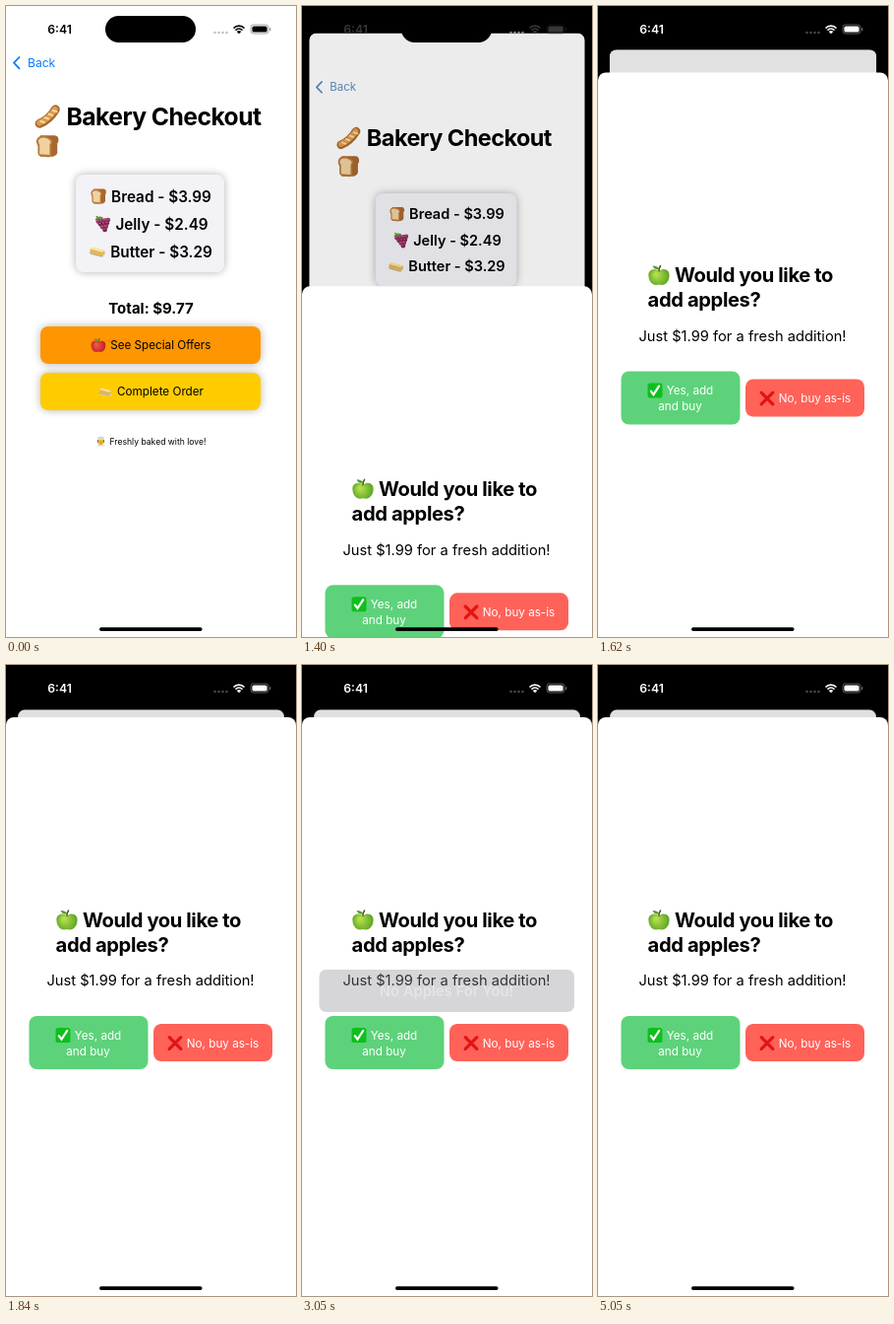
Recreate the animation shown at these times as an HTML page with a canvas. Size 295x640 px, loop 5.59 s.

```html
<!DOCTYPE html>
<html lang="en">
<head>
<meta charset="utf-8">
<title>Bakery Checkout</title>
<style>
  html, body { margin: 0; width: 100%; height: 100%; overflow: hidden; background: #fff; }
  canvas { display: block; width: 295px; height: 640px; }
</style>
</head>
<body>
<canvas id="stage"></canvas>
<script>
const W = 295, H = 640, LOOP = 5590;
const STEPS = [0, 1180, 1290, 1400, 1510, 1620, 1730, 1840, 2810, 2930, 3050, 3160, 3280, 3400, 5050];
const SHEET_TOP = 53, CORNER = 8;

const canvas = document.getElementById('stage');
const ctx = canvas.getContext('2d');
const ratio = window.devicePixelRatio || 1;
canvas.width = W * ratio;
canvas.height = H * ratio;

const clamp = v => Math.max(0, Math.min(1, v));
const ramp = (t, from, to) => clamp((t - from) / (to - from));
const smooth = v => v * v * (3 - 2 * v);
const mix = (from, to, amount) => from.map((v, i) => Math.round(v + (to[i] - v) * amount));

// Critically damped spring, 0 at rest and 1 when settled.
function spring(seconds, speed) {
  const x = Math.max(0, seconds) * speed;
  return 1 - (1 + x) * Math.exp(-x);
}

function group(alpha, draw) {
  ctx.save();
  ctx.globalAlpha *= alpha;
  draw();
  ctx.restore();
}

function box(x, y, w, h, r, fill) {
  ctx.beginPath();
  ctx.roundRect(x, y, w, h, r);
  ctx.fillStyle = fill;
  ctx.fill();
}

function shadowBox(x, y, w, h, r, fill) {
  ctx.save();
  ctx.shadowColor = 'rgba(0,0,0,0.3)';
  ctx.shadowBlur = 9 * ratio;
  box(x, y, w, h, r, fill);
  ctx.restore();
}

function text(str, x, y, size, weight = 400, color = '#000', spacing = 0, align = 'center') {
  ctx.font = `${weight} ${size}px Inter, "Liberation Sans", sans-serif`;
  ctx.letterSpacing = spacing + 'px';
  ctx.textAlign = align;
  ctx.textBaseline = 'alphabetic';
  ctx.fillStyle = color;
  ctx.fillText(str, x, y + size * 0.36);
}

function blob(path, fill) {
  ctx.fillStyle = fill;
  ctx.fill(new Path2D(path));
}

function line(path, color, width) {
  ctx.strokeStyle = color;
  ctx.lineWidth = width;
  ctx.stroke(new Path2D(path));
}

function dot(x, y, r, fill) {
  ctx.beginPath();
  ctx.arc(x, y, r, 0, Math.PI * 2);
  ctx.fillStyle = fill;
  ctx.fill();
}

function apple(light, dark) {
  const shade = ctx.createRadialGradient(-3, -1, 1, 0, 2, 12);
  shade.addColorStop(0, light);
  shade.addColorStop(1, dark);
  blob('M0-4C5-8 11-5 10 1C10 6 6 10 2.500 9.500Q0 8.500-2.500 9.500C-6 10-10 6-10 1C-11-5-5-8 0-4Z', shade);
  line('M0-4Q0-7 1.500-9', '#6b4a24', 1.5);
  blob('M0.500-5.500Q-1-9-6-9Q-5-5 0.500-5.500Z', '#4f9d2c');
}

// Every icon is drawn in a box from -10 to 10.
const icons = {
  baguette() {
    line('M-7 6Q1 3 6.500-6', '#a9662b', 7.500);
    line('M-7 5.500Q1 2 6-6', '#dc9c50', 5);
    for (let i = 0; i < 4; i++) {
      const x = -6 + i * 3.5, y = 4 - i * 3;
      line(`M${x} ${y}l3 1`, '#f8dcaa', 1.6);
    }
  },
  bread() {
    blob('M-6-9H6Q10-9 9.500-4L8.500-2V6Q8 8 5 9L-6 9Z', '#a7672f');
    blob('M-7-8Q-2-10 3-6.500Q6-4 3.500-1V8Q3 9.500 1 9.500L-6 8.500Q-8 8-8 6V0Q-11-5-7-8Z', '#b9793c');
    blob('M-6-6.500Q-2-8 2-5Q4-3 2-1.500V7.500L-6.500 6.800V-1Q-9-4.500-6-6.500Z', '#f0d2a0');
  },
  grapes() {
    line('M-4-6L-7-9', '#6f7a2c', 1.6);
    blob('M-9-5Q-6-11 1-8Q0-3-4-3Z', '#5f9a3b');
    for (let row = 0; row < 4; row++) {
      for (let i = 0; i < 4 - row; i++) {
        const x = -5 + i * 4 + row * 2.7, y = -3 + row * 3.4 - i * 0.6;
        dot(x, y, 2.9, row % 2 ? '#7c2450' : '#96305f');
        dot(x - 0.8, y - 0.9, 0.9, '#c2709a');
      }
    }
  },
  butter() {
    blob('M-10 0L-7-1L10 2L8 6Q5 8 0 6L-8 4Z', '#d9d6d1');
    blob('M-9-3L-6-5L9-1V3L6 5L-9 1Z', '#e7b64c');
    blob('M-9-3L-6-5L9-1L6 1Z', '#fbe6a0');
    line('M-9 2L6 6', '#b98d4a', 0.9);
  },
  redApple() { apple('#f4584a', '#b9151d'); },
  greenApple() { apple('#b5e04d', '#4f9a1e'); },
  cook() {
    blob('M-8 10Q-8 5 0 5Q8 5 8 10Z', '#dfe3e8');
    blob('M-6-3H6V3Q4 8 0 8Q-4 8-6 3Z', '#f6bf35');
    line('M-6-2V2M6-2V2', '#7c5230', 1.8);
    blob('M-6-3L-7-6Q-7-10-3-9Q0-11 3-9Q7-10 7-6L6-3Z', '#d4d9e0');
    dot(-2.2, 0.5, 0.8, '#55391c');
    dot(2.2, 0.5, 0.8, '#55391c');
    line('M-2 4Q0 5.500 2 4', '#80501c', 0.9);
  },
  check() {
    box(-10, -10, 20, 20, 3.5, '#0fbf1d');
    line('M-5.500 1L-2 5.500L5.500-6', '#fff', 3);
  },
  cross() { line('M-7.500-7.500L7.500 7.500M7.500-7.500L-7.500 7.500', '#e31414', 4.200); }
};

function icon(name, x, y, size) {
  ctx.save();
  ctx.translate(x, y);
  ctx.scale(size / 20, size / 20);
  ctx.lineCap = 'round';
  icons[name]();
  ctx.restore();
}

// The link loses its tint as the page goes inactive.
function drawCheckout(offerAlpha, inactive) {
  const tint = `rgb(${mix([8, 123, 255], [150, 150, 150], inactive)})`;
  box(0, 0, W, H, 0, '#fff');
  ctx.lineCap = ctx.lineJoin = 'round';
  line('M13.500 52L8 57.700L13.500 63.400', tint, 1.8);
  text('Back', 22, 57.5, 12.1, 400, tint, 0, 'left');

  icon('baguette', 42.5, 112, 24);
  text('Bakery Checkout', 160.5, 112, 24.7, 700, '#000', -0.58);
  icon('bread', 42, 142, 24);

  shadowBox(71, 171, 151, 99, 8, '#f2f2f7');
  icon('bread', 94, 193, 16.5);
  text('Bread - $3.99', 158, 193, 15.3, 600);
  icon('grapes', 98, 221, 16.5);
  text('Jelly - $2.49', 158.5, 221, 15.3, 600);
  icon('butter', 93, 249, 16.5);
  text('Butter - $3.29', 158, 249, 15.3, 600);
  text('Total: $9.77', 147.5, 306.5, 15, 700);

  shadowBox(35, 372, 224, 38, 8, '#ffcc00');
  icon('butter', 101, 391, 14);
  text('Complete Order', 157, 391, 11.7);

  group(offerAlpha, () => {
    // A translucent button must not show its own shadow through itself.
    if (offerAlpha === 1) shadowBox(35, 325, 224, 38, 8, '#ff9500');
    else box(35, 325, 224, 38, 8, '#ff9500');
    icon('redApple', 94, 344, 14.5);
    text('See Special Offers', 157.3, 344, 11.7);
  });

  icon('cook', 96.5, 441.5, 10);
  text('Freshly baked with love!', 154.5, 441.5, 8.6);
}

function drawSheet(top, declineAlpha, toastAlpha) {
  ctx.save();
  ctx.translate(0, top - SHEET_TOP);
  box(0, SHEET_TOP, W, H, [CORNER, CORNER, 0, 0], '#fff');

  icon('greenApple', 62, 258.5, 21);
  text('Would you like to', 158.5, 258.5, 20.2, 700, '#000', -0.4);
  text('add apples?', 108, 283.5, 20.2, 700, '#000', -0.4);
  text('Just $1.99 for a fresh addition!', 147, 320, 14.7);

  box(23.5, 356, 121, 54, 8, '#5dd27a');
  icon('check', 58, 375.5, 15);
  text('Yes, add', 93.5, 375.5, 11.7, 400, '#fff');
  text('and buy', 83.5, 391.5, 11.7, 400, '#fff');

  box(150, 364, 121, 38, 8, '#ff6259');
  group(declineAlpha, () => {
    icon('cross', 172, 383.5, 15.5);
    text('No, buy as-is', 220.5, 383.5, 11.7, 400, '#fff');
  });

  group(toastAlpha, () => {
    box(17.5, 309, 259.5, 43, 7, '#8e8e93');
    text('No Apples For You!', 147, 330.5, 14.8, 600, '#fff');
  });
  ctx.restore();
}

function drawStatus(brightness) {
  const level = Math.round(255 * brightness);
  const color = `rgb(${level},${level},${level})`;
  const faint = Math.round(195 - 125 * clamp(brightness * 2));
  box(101, 10, 92, 27, 13.5, '#000');
  text('6:41', 54.5, 23.5, 12.2, 600, color);

  for (let i = 0; i < 4; i++) dot(212.5 + i * 4, 27, 1.3, `rgb(${faint},${faint},${faint})`);

  ctx.lineCap = 'butt';
  ctx.strokeStyle = color;
  ctx.lineWidth = 1.7;
  for (const r of [7.8, 4.9]) {
    ctx.beginPath();
    ctx.arc(237, 28, r, -Math.PI * 0.75, -Math.PI * 0.25);
    ctx.stroke();
  }
  blob('M237 28.300L234.700 26Q237 24.200 239.300 26Z', color);

  group(0.4, () => {
    ctx.beginPath();
    ctx.roundRect(249, 19, 18, 9, 2.8);
    ctx.lineWidth = 0.9;
    ctx.stroke();
    box(268, 22, 1.3, 3.2, 0.6, color);
  });
  box(250.4, 20.4, 15.2, 6.2, 1.7, color);
}

function drawScene(t) {
  const rise = t >= 1840 ? 1 : spring((t - 1273) / 1000, 16.1);
  const offerAlpha = t < 1180 ? 1 : 0.2 + 0.8 * ramp(t, 1230, 1400);
  const declineAlpha = t < 2810 ? 1 : 0.2 + 0.8 * ramp(t, 2860, 3040);
  const toastAlpha = t < 5050 ? smooth(ramp(t, 2880, 3300)) : 0;

  ctx.setTransform(ratio, 0, 0, ratio, 0, 0);
  box(0, 0, W, H, 0, '#000');

  // The page shrinks into a dimmed card while the sheet rises over it.
  const inset = 12 * rise;
  const scale = 1 - 2 * inset / W;
  ctx.save();
  ctx.translate(inset, 45.3 * rise);
  ctx.scale(scale, scale);
  ctx.beginPath();
  ctx.roundRect(0, 0, W, H, CORNER * clamp(rise * 4));
  ctx.clip();
  drawCheckout(offerAlpha, rise);
  box(0, 0, W, H, 0, `rgba(0,0,0,${0.12 * rise})`);
  ctx.restore();

  if (rise > 0) drawSheet(SHEET_TOP + (H - SHEET_TOP) * (1 - rise), declineAlpha, toastAlpha);
  drawStatus(ramp(t, 1340, 1620));
  box(95, 630.2, 104.6, 3.8, 1.9, '#000');
}

const start = performance.now();
let shown = -1;

function tick(now) {
  const t = Math.max(0, now - start) % LOOP;
  const step = STEPS.findLast(time => time <= t);
  if (step !== shown) {
    shown = step;
    drawScene(step);
  }
  requestAnimationFrame(tick);
}

tick(start);
</script>
</body>
</html>
```
